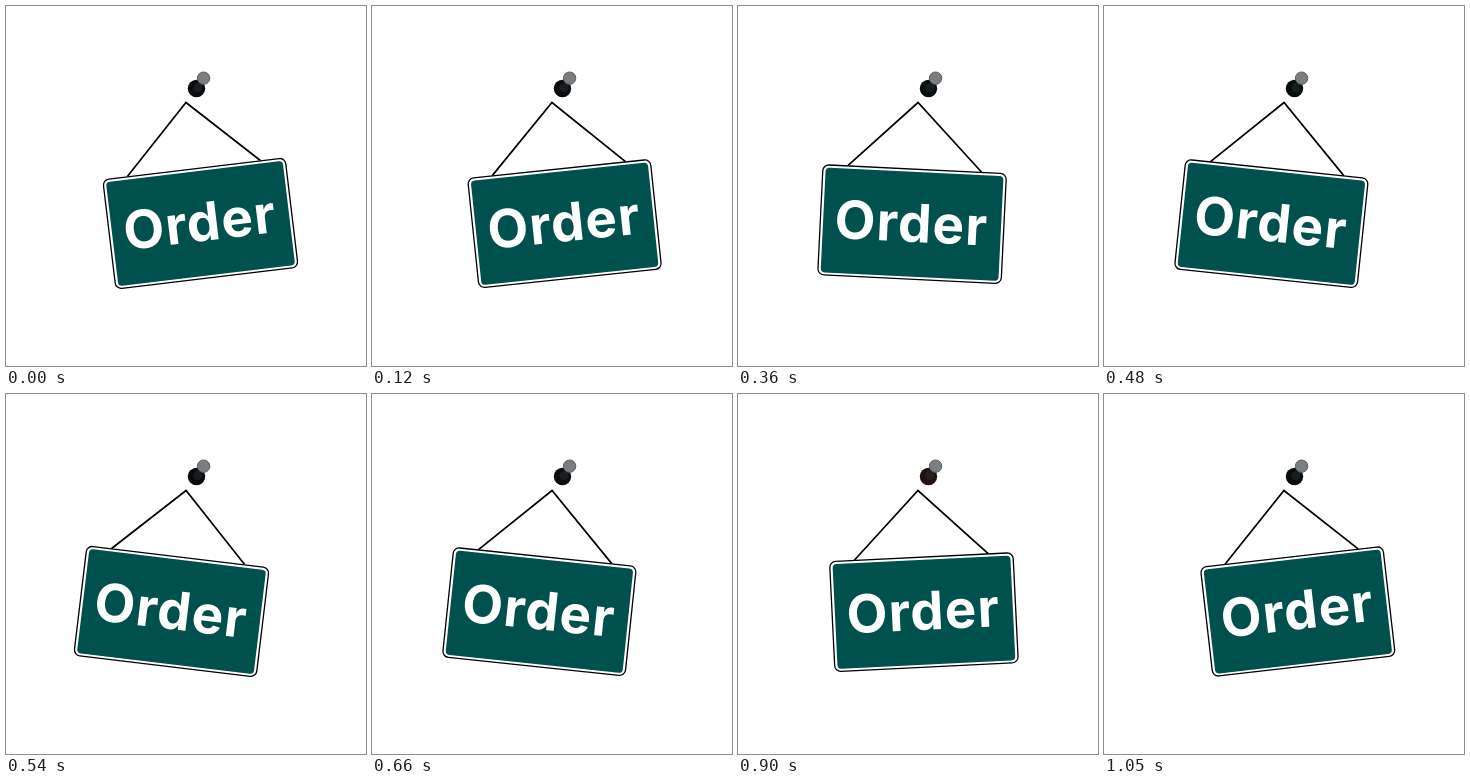
An HTML page for the animation above (1080 ms loop, 360x360 px).

```html
<!DOCTYPE html>
<html lang="en">
<head>
<meta charset="utf-8">
<title>Swinging sign</title>
<style>
  html, body { margin: 0; width: 100%; height: 100%; overflow: hidden; background: #fff; }
  svg { display: block; width: 100vw; height: 100vh; }
  text { font: 650 53px Inter, "Open Sans", sans-serif; letter-spacing: 1.2px; fill: #fff; text-anchor: middle; }
</style>
</head>
<body>
<svg viewBox="0 0 360 360">
  <g id="pin">
    <circle id="base" cx="190.5" cy="82.5" r="8.7"/>
    <circle cx="192" cy="81.5" r="4.5" fill="#30383a" opacity=".4"/>
    <circle cx="197.6" cy="72.2" r="6.2" fill="#7a7e80" stroke="#5a5e60"/>
  </g>
  <!-- Origin is the point the sign hangs from -->
  <g id="sign" transform="translate(180 97)">
    <path d="M-67 66L0 -.5L67 66" fill="none" stroke="#000" stroke-width="1.7"/>
    <rect x="-91.8" y="66.3" width="183.6" height="110" rx="6" fill="#fff" stroke="#000" stroke-width="1.3"/>
    <rect x="-89" y="69" width="178" height="104.8" rx="4" fill="#00514e"/>
    <text x="-.6" y="139">Order</text>
  </g>
</svg>
<script>
  const LOOP = 1080, TICK = 30, SWING = 6.9;
  const sign = document.getElementById("sign");
  const base = document.getElementById("base");

  // 30 poses over 36 ticks: every sixth tick holds the pose
  function poseAt(t) {
    const tick = Math.floor(t / TICK);
    return tick - 1 - Math.floor((tick - 1) / 6);
  }

  function draw(now) {
    const t = now % LOOP;
    const angle = -SWING * Math.cos(Math.PI * (poseAt(t) - 0.5) / 15);
    sign.setAttribute("transform", `translate(180 97) rotate(${angle})`);

    const glow = Math.max(0, 1 - Math.abs(t - 800) / 150);
    base.setAttribute("fill", `rgb(${8 + 78 * glow}, ${12 + 14 * glow}, ${13 + 9 * glow})`);
  }

  const start = performance.now();
  function loop() {
    draw(performance.now() - start);
    requestAnimationFrame(loop);
  }
  loop();
</script>
</body>
</html>
```
